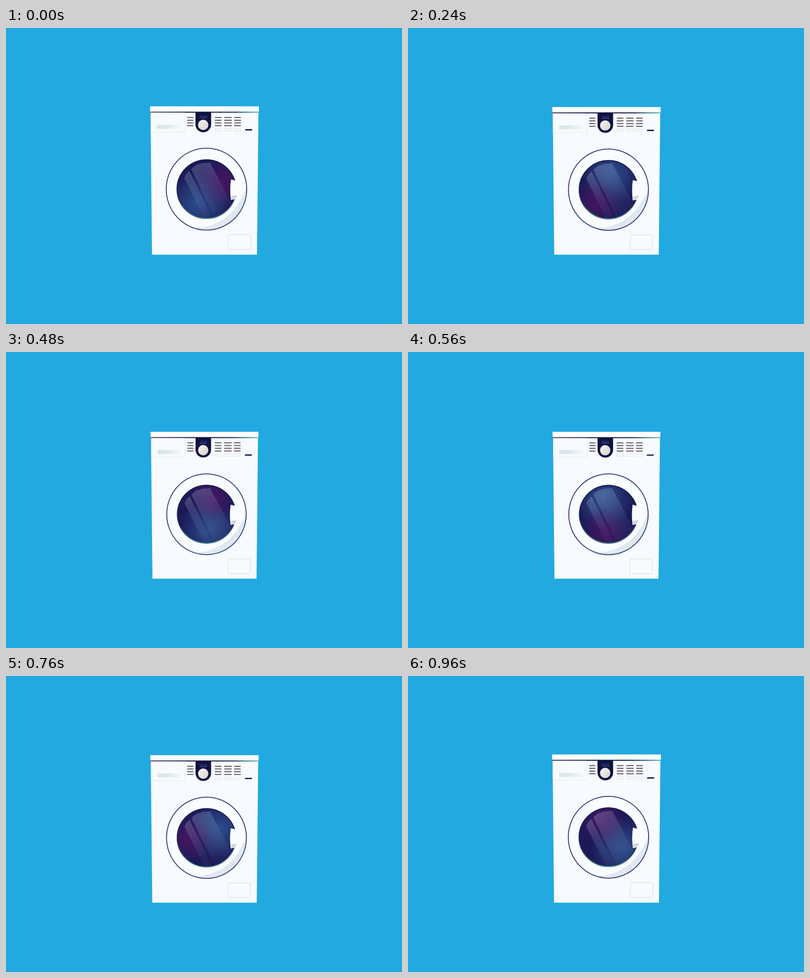
These frames come from a looping animation (800 px wide and 600 px high, 1 s). An HTML page with a canvas:

```html
<!DOCTYPE html>
<html lang="en">
<head>
<meta charset="utf-8">
<title>Washing machine</title>
<style>
html, body { margin: 0; width: 100%; height: 100%; overflow: hidden; background: #22a9e0; }
canvas { display: block; width: 800px; height: 600px; }
</style>
</head>
<body>
<canvas id="stage" width="800" height="600"></canvas>
<script>
const ctx = document.getElementById('stage').getContext('2d');
const LOOP = 1000, STEP = 40, PEAK = 535;
const TURNS = 6;
const TAU = Math.PI * 2;
const DOOR = { x: 405, y: 326.7 };

function poly(points, fill) {
  ctx.beginPath();
  points.forEach(([x, y]) => ctx.lineTo(x, y));
  ctx.closePath();
  ctx.fillStyle = fill;
  ctx.fill();
}

function rounded(x, y, w, h, r) {
  ctx.beginPath();
  ctx.roundRect(x, y, w, h, r);
}

function box(x, y, w, h, r, color) {
  rounded(x, y, w, h, r);
  ctx.strokeStyle = color;
  ctx.lineWidth = 1;
  ctx.stroke();
}

function disc(x, y, r, fill) {
  ctx.beginPath();
  ctx.arc(x, y, r, 0, TAU);
  ctx.fillStyle = fill;
  ctx.fill();
}

function linear(x0, y0, x1, y1, ...colors) {
  const g = ctx.createLinearGradient(x0, y0, x1, y1);
  colors.forEach((c, i) => g.addColorStop(i / (colors.length - 1), c));
  return g;
}

// Squash amount: 0 at rest, 1 at the lowest pose
function squash(t) {
  const ramp = t < PEAK ? t / PEAK : (LOOP - t) / (LOOP - PEAK);
  const soft = (1 - Math.cos(Math.PI * ramp)) / 2;
  return 0.7 * ramp + 0.3 * soft;
}

function drawBody() {
  poly([[292, 170], [510, 170], [507, 459.4], [295, 459.4]], '#f7fbff');
  poly([[291, 158.7], [511, 158.7], [510.7, 171], [291.3, 171]], '#fcfeff');
  ctx.fillStyle = linear(291, 0, 511, 0, '#51345f', '#25214f', '#17184c', '#1d2b58', '#5fc0b8');
  ctx.fillRect(291.4, 169.6, 219.2, 2.1);
  box(449, 419, 45.5, 30.3, 2, '#d3dce3');
}

function drawPanel() {
  box(292.7, 172, 69, 39, 0, '#e2e8ed');
  rounded(305, 196, 48, 8.3, 3);
  ctx.fillStyle = linear(305, 0, 353, 0, '#d6e5e6', '#dfebee', '#f1f6f9');
  ctx.fill();

  ctx.fillStyle = '#51474f';
  for (const [x, w] of [[366, 12.5], [422, 13.5], [441, 15], [461, 13.5]]) {
    for (let row = 0; row < 4; row++) ctx.fillRect(x, 180.5 + row * 5.55, w, 1.8);
  }
  for (const x of [422, 441, 460]) box(x, 203.7, 14, 5, 1.5, '#d9e0e5');

  rounded(483, 205, 14.5, 2.7, 1.2);
  ctx.fillStyle = '#15154f';
  ctx.fill();

  rounded(382.8, 170.5, 31.6, 40.9, [0, 0, 15.8, 15.8]);
  ctx.fillStyle = '#10123f';
  ctx.fill();
  ctx.fillStyle = '#1b2659';
  ctx.fillRect(391, 177, 15, 7);
  ctx.fillStyle = '#34477f';
  ctx.fillRect(393, 181.5, 9, 1);
  ctx.fillRect(404, 177.5, 1, 5);
  disc(398.4, 196.4, 10.5, linear(390, 188, 407, 205, '#f5f2ed', '#e6e3de', '#d8d6d3'));
}

function glow(angle, dist, r, rgb, alpha) {
  const x = DOOR.x + Math.cos(angle) * dist;
  const y = DOOR.y + Math.sin(angle) * dist;
  const g = ctx.createRadialGradient(x, y, 0, x, y, r);
  g.addColorStop(0, `rgba(${rgb},${alpha})`);
  g.addColorStop(0.45, `rgba(${rgb},${alpha * 0.6})`);
  g.addColorStop(1, `rgba(${rgb},0)`);
  ctx.fillStyle = g;
  ctx.fillRect(340, 260, 130, 130);
}

function drawGlass(angle) {
  const { x, y } = DOOR;
  ctx.save();
  ctx.beginPath();
  ctx.arc(x, y, 60.3, 0, TAU);
  ctx.clip();
  ctx.fillStyle = '#1b1a57';
  ctx.fillRect(340, 260, 130, 130);
  glow(angle + 2.6, 34, 62, '48,88,150', 0.8);
  glow(angle, 37, 50, '78,20,98', 0.8);

  poly([[360, 304], [364, 296], [370.5, 289.5], [418, 388], [402, 388]],
    linear(365, 290, 410, 385, 'rgba(190,205,235,.26)', 'rgba(150,170,220,.14)', 'rgba(150,170,220,.03)'));
  poly([[374, 286], [384, 278], [397, 274], [412.5, 273], [455, 354], [429, 388], [424, 388]],
    linear(390, 275, 440, 375, 'rgba(190,205,235,.25)', 'rgba(150,170,220,.14)', 'rgba(150,170,220,.03)'));
  ctx.restore();

  ctx.beginPath();
  ctx.arc(x, y, 59.4, 0, TAU);
  ctx.lineWidth = 2;
  ctx.strokeStyle = linear(0, 267, 0, 387, '#17184d', '#1b1f55', '#23315f', '#3f8580');
  ctx.stroke();
}

function drawHandle() {
  ctx.beginPath();
  ctx.moveTo(454.5, 307);
  ctx.lineTo(462, 309);
  ctx.lineTo(470, 309);
  ctx.lineTo(470, 346);
  ctx.lineTo(461, 347);
  ctx.lineTo(454.3, 348.8);
  ctx.quadraticCurveTo(451.6, 327, 454.5, 307);
  ctx.fillStyle = '#fafdff';
  ctx.fill();
  poly([[455, 341], [466, 338], [465, 344.5], [455, 347]], '#c9d7e4');
}

function drawDoor(angle) {
  const { x, y } = DOOR;
  ctx.beginPath();
  ctx.ellipse(x, y, 81.3, 83, 0, 0, TAU);
  ctx.fillStyle = '#fafdff';
  ctx.fill();

  ctx.save();
  ctx.clip();
  ctx.beginPath();
  ctx.moveTo(487, 321);
  ctx.bezierCurveTo(471, 365, 440, 402, 386, 405);
  ctx.lineTo(386, 412);
  ctx.lineTo(488, 412);
  ctx.fillStyle = '#e0e9f1';
  ctx.fill();
  ctx.restore();

  ctx.beginPath();
  ctx.ellipse(x, y, 81.3, 83, 0, 0, TAU);
  ctx.strokeStyle = '#2d3b75';
  ctx.lineWidth = 1.8;
  ctx.stroke();

  drawGlass(angle);
  drawHandle();
}

function scaled(cx, cy, sx, sy, draw) {
  ctx.save();
  ctx.translate(cx, cy);
  ctx.scale(sx, sy);
  ctx.translate(-cx, -cy);
  draw();
  ctx.restore();
}

function frame(now) {
  const t = Math.floor((now % LOOP) / STEP) * STEP;
  const p = squash(t);
  const angle = -0.45 + TAU * TURNS * t / LOOP;

  ctx.fillStyle = '#22a9e0';
  ctx.fillRect(0, 0, 800, 600);
  scaled(401, 459.4, 1 - 0.009 * p, 1 - 0.0108 * p, () => {
    drawBody();
    drawPanel();
  });
  // The door sinks a little further than the body
  ctx.save();
  ctx.translate(0, 2.4 * p);
  scaled(DOOR.x, DOOR.y, 1 - 0.014 * p, 1 - 0.015 * p, () => drawDoor(angle));
  ctx.restore();
}

const start = performance.now();
function tick() {
  frame(performance.now() - start);
  requestAnimationFrame(tick);
}
tick();
</script>
</body>
</html>
```
